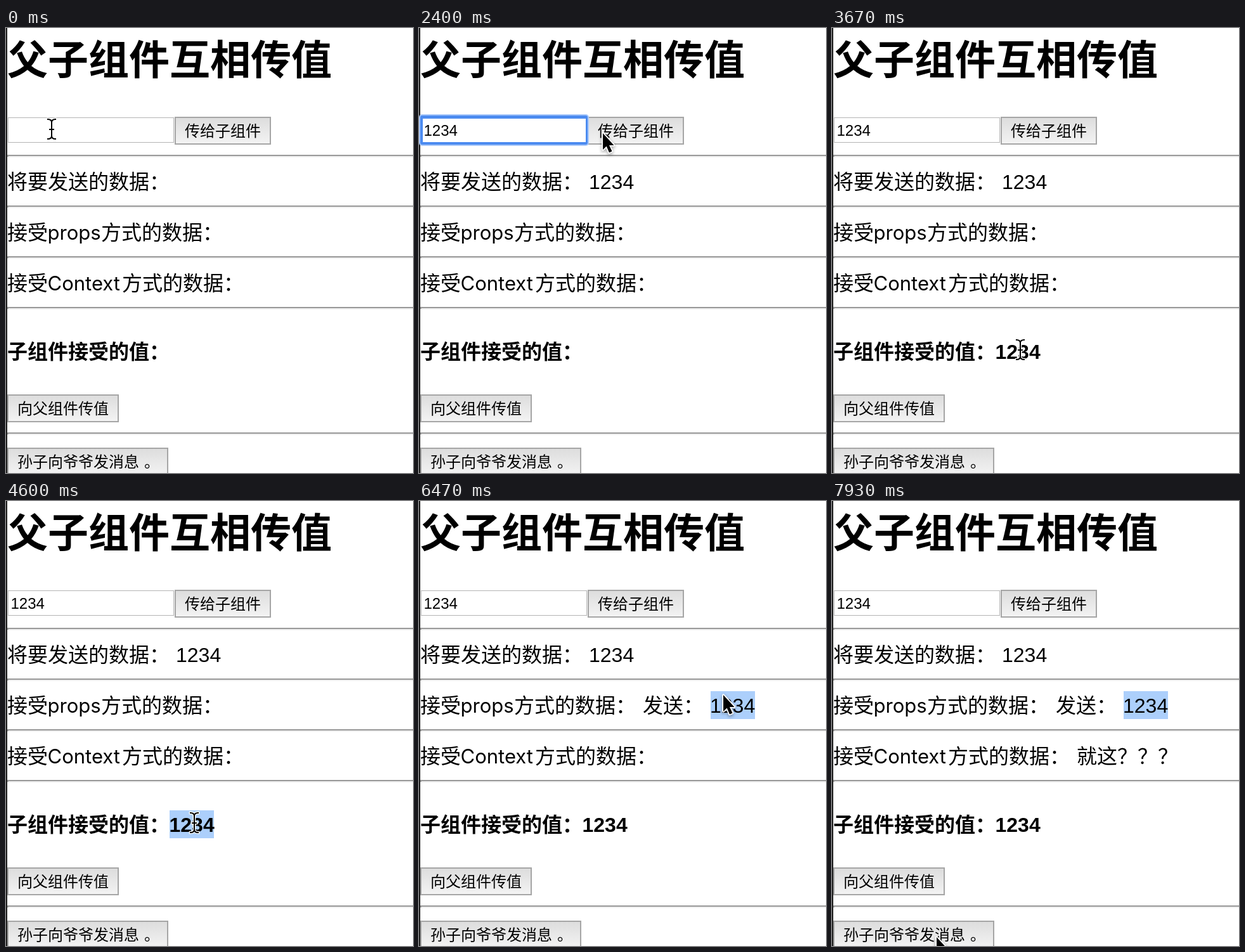
An HTML page with a canvas for the animation above (8000 ms loop, 642 px wide and 702 px high).

```html
<!DOCTYPE html>
<html lang="zh-CN">
<head>
<meta charset="utf-8">
<title>父子组件互相传值</title>
<style>
html, body { margin: 0; width: 100%; height: 100%; overflow: hidden; background: #fff; }
canvas { display: block; }
</style>
</head>
<body>
<canvas id="stage" width="642" height="702"></canvas>
<script>
const ctx = document.getElementById('stage').getContext('2d');
const LOOP = 8000;
const CJK = '"Noto Sans CJK SC", "Noto Sans CJK", sans-serif';
const WORD = 'Inter, sans-serif';
const DIGIT = '"Liberation Sans", Arial, sans-serif';
const SELECTION = '#accffb';

// Event times in ms
const FOCUS = 400, BLUR = 2870, KEYS = [930, 1130, 1330, 1530];
const CHILD_VALUE = 3000, SELECT_CHILD = 4130, PROPS_VALUE = 5270;
const DESELECT = 6270, SELECT_PROPS = 6470, CONTEXT_VALUE = 7670;

// Pointer moves: from t0 to t1 along a quadratic path, shape while moving and after
const START = { x: 72, y: 160 };
const MOVES = [
  { t0: 2000, t1: 2400, via: [180, 158], to: [290, 166], moving: 'arrow', rest: 'arrow' },
  { t0: 3230, t1: 3670, via: [338, 340], to: [297, 508], moving: 'arrow', rest: 'beam' },
  { t0: 4820, t1: 5130, via: [215, 545], to: [101, 601], moving: 'arrow', rest: 'arrow' },
  { t0: 5610, t1: 6130, via: [250, 420], to: [480, 306], moving: 'arrow', rest: 'arrow' },
  { t0: 6530, t1: 7270, via: [360, 500], to: [190, 652], moving: 'arrow', rest: 'arrow' },
  { t0: 7270, t1: 7600, via: [170, 664], to: [165, 688], moving: 'arrow', rest: 'arrow' }
];

function box(x, y, w, h, color) {
  ctx.fillStyle = color;
  ctx.fillRect(x, y, w, h);
}

function text(str, x, y, size = 32, weight = 400, family = CJK) {
  ctx.font = `${weight} ${size}px ${family}`;
  ctx.fillStyle = '#000';
  ctx.fillText(str, x, y);
}

const word = (str, x, y) => text(str, x, y, 31, 400, WORD);
const digits = (str, x, y, size = 32, weight = 400) => text(str, x, y, size, weight, DIGIT);

function rule(y) {
  box(2, y, 640, 2, '#999');
  box(2, y + 2, 640, 2, '#eee');
  box(2, y, 2, 3, '#999');
}

function button(label, x, y, w) {
  const fill = ctx.createLinearGradient(0, y, 0, y + 44);
  fill.addColorStop(0, '#dcdcdc');
  fill.addColorStop(1, '#f4f4f4');
  box(x, y, w, 44, '#a6a6a6');
  box(x + 2, y + 2, w - 4, 40, fill);
  text(label, x + 16, y + 31, 24);
}

function ring(x, y, w, h, r, color) {
  ctx.fillStyle = color;
  ctx.beginPath();
  ctx.roundRect(x, y, w, h, r);
  ctx.fill();
}

function input(t, typed) {
  const focused = t >= FOCUS && t < BLUR;
  if (focused) {
    ring(0, 136, 268, 50, 5, '#a9c8fa');
    ring(2, 138, 264, 46, 3, '#4c8bf0');
    box(6, 143, 257, 37, '#fff');
  } else {
    box(3, 141, 262, 40, '#b4b4b4');
    box(4, 142, 260, 38, '#fff');
  }
  digits(typed, 7.5, 170, 24);
  if (!focused) return;
  const lastKey = [FOCUS, ...KEYS].filter(k => k <= t).pop();
  if ((t - lastKey) % 1000 < 500) {
    const x = 6.5 + 13.4 * typed.length;
    box(Math.round(x), 146, 2, 30, '#000');
  }
}

function pointer(t) {
  let { x, y } = START, shape = 'beam';
  for (const { t0, t1, via, to, moving, rest } of MOVES) {
    if (t < t0) break;
    const p = Math.min(1, (t - t0) / (t1 - t0));
    const e = p * p * (3 - 2 * p), q = 1 - e;
    x = q * q * x + 2 * q * e * via[0] + e * e * to[0];
    y = q * q * y + 2 * q * e * via[1] + e * e * to[1];
    shape = p < 1 ? moving : rest;
  }
  return { x, y, shape };
}

function arrow() {
  const path = new Path2D('M0 0V26L5.7 20.5L10 30.5L14.5 28.5L10 19H17.5Z');
  ctx.lineJoin = 'round';
  ctx.save();
  ctx.shadowColor = 'rgba(0,0,0,.4)';
  ctx.shadowBlur = 5;
  ctx.shadowOffsetY = 2;
  ctx.strokeStyle = '#fff';
  ctx.lineWidth = 3.5;
  ctx.stroke(path);
  ctx.restore();
  ctx.fillStyle = '#000';
  ctx.fill(path);
}

function beam() {
  const path = new Path2D(
    'M-6 -16Q0 -16 0 -11Q0 -16 6 -16M0 -11V10M-6 15Q0 15 0 10Q0 15 6 15M-3 0H3');
  ctx.lineCap = 'square';
  for (const [color, width] of [['#fff', 4.5], ['#000', 2]]) {
    ctx.strokeStyle = color;
    ctx.lineWidth = width;
    ctx.stroke(path);
  }
}

function drawPointer(t) {
  if (t >= KEYS[0] && t < MOVES[0].t0) return;
  const { x, y, shape } = pointer(t);
  ctx.save();
  ctx.translate(x, y);
  shape === 'beam' ? beam() : arrow();
  ctx.restore();
}

function draw(t) {
  const typed = '1234'.slice(0, KEYS.filter(k => k <= t).length);
  box(0, 0, 642, 702, '#fff');
  box(0, 0, 2, 702, '#222');

  text('父子组件互相传值', 2, 73, 64, 700);
  button('传给子组件', 266, 140, 152);
  input(t, typed);
  [200, 280, 360, 440, 638].forEach(rule);

  text('将要发送的数据：', 2, 254);
  digits(typed, 268, 254);

  text('接受', 2, 334);
  word('props', 65.5, 334);
  text('方式的数据：', 150, 334);
  if (t >= PROPS_VALUE) {
    if (t >= SELECT_PROPS) box(460, 300, 70, 44, SELECTION);
    text('发送：', 353, 334);
    digits('1234', 459, 334);
  }

  text('接受', 2, 414);
  word('Context', 65.5, 414);
  text('方式的数据：', 183, 414);
  if (t >= CONTEXT_VALUE) text('就这？？？', 386, 414);

  if (t >= SELECT_CHILD && t < DESELECT) box(258, 488, 70, 44, SELECTION);
  text('子组件接受的值：', 2, 522, 32, 700);
  if (t >= CHILD_VALUE) digits('1234', 257.5, 522, 32, 700);

  button('向父组件传值', 2, 578, 176);
  button('孙子向爷爷发消息', 2, 662, 254);
  text('。', 218, 693, 24);
  drawPointer(t);
}

let start;
function tick(now) {
  start ??= now;
  draw((now - start) % LOOP);
  requestAnimationFrame(tick);
}
draw(0);
requestAnimationFrame(tick);
</script>
</body>
</html>
```
